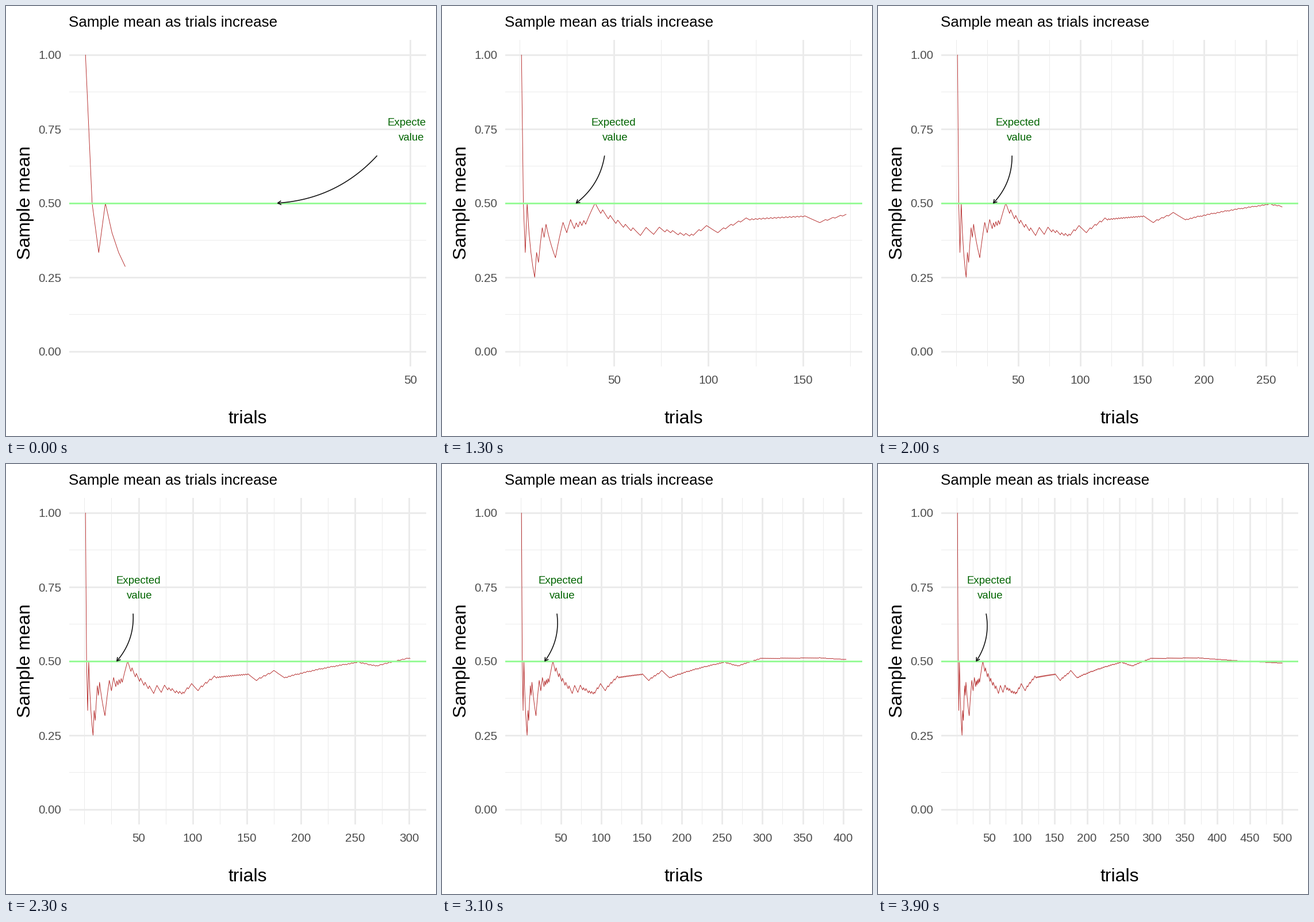
Write a matplotlib script that moves like this. It is 748x748 px and loops after 5000 ms.

```python
import matplotlib.pyplot as plt
import numpy as np
from matplotlib.animation import FuncAnimation
from matplotlib.patches import Rectangle

SIZE = 748
DPI = 100
PX = 72 / DPI

LEFT, RIGHT, TOP, BOTTOM = 110, 731.5, 58.5, 626.5
MID_X = (LEFT + RIGHT) / 2
PAD = (RIGHT - LEFT) * 0.05 / 1.1
TRIALS = 500
REVEAL_FRAMES = 40
FRAMES = 50

plt.rcParams["font.family"] = "Liberation Sans"


def coin_means():
    """Running mean of tosses whose head count passes a few key points."""
    keys = np.array([
        (1, 1), (4, 2), (9, 3), (12, 5), (14, 6), (19, 6), (23, 10), (25, 10),
        (27, 12), (34, 15), (40, 20), (44, 21), (60, 25), (64, 25), (67, 28),
        (71, 28), (74, 31), (91, 36), (99, 42), (104, 42), (120, 54),
        (151, 69), (158, 69), (175, 82), (184, 82), (253, 126), (270, 131),
        (298, 152), (371, 190), (TRIALS, 247),
    ])
    heads = np.floor(np.interp(trial, *keys.T) + 1e-9)
    return heads / trial


trial = np.arange(1, TRIALS + 1)
mean = coin_means()

fig = plt.figure(figsize=(SIZE / DPI, SIZE / DPI), dpi=DPI, facecolor="white")
ax = fig.add_axes([0, 0, 1, 1])
ax.set(xlim=(0, SIZE), ylim=(SIZE, 0))
ax.axis("off")
panel = Rectangle((LEFT, TOP), RIGHT - LEFT, BOTTOM - TOP,
                  transform=ax.transData)


def y_pos(value):
    return 600.8 - 516 * value


def line(x, y, color, width, zorder, smooth=True):
    artist, = ax.plot(x, y, color=color, lw=width * PX, zorder=zorder,
                      antialiased=smooth, solid_capstyle="butt")
    artist.set_clip_path(panel)


def label(x, y, text, size, color="black", **kwargs):
    kwargs = {"ha": "center", "va": "baseline", **kwargs}
    return ax.text(x, y, text, fontsize=size * PX, color=color, zorder=6,
                   **kwargs)


def grid_line(x, y, major):
    line(x, y, "#EBEBEB", 3 if major else 1, int(major), smooth=False)


def draw_titles():
    label(LEFT - 0.5, 36, "Sample mean as trials increase", 26, ha="left")
    label(MID_X, 726, "trials", 32)
    label(42, 342, "Sample mean", 32, rotation=90, rotation_mode="anchor")


def draw_grid(x_pos, low, high):
    for i in range(9):
        y = y_pos(i / 8)
        major = i % 2 == 0
        grid_line([LEFT, RIGHT], [y, y], major)
        if major:
            label(96.5, y + 7.7, f"{i / 8:.2f}", 20.8, "#4D4D4D", ha="right")

    majors = [b for b in range(50, TRIALS + 1, 50) if b <= high]
    minors = [b for b in range(0, TRIALS + 50, 25)
              if low <= b <= high and b not in majors]
    if len(majors) < 2:
        minors = []
    for b in majors + minors:
        grid_line([x_pos(b)] * 2, [TOP, BOTTOM], b in majors)
    for b in majors:
        label(x_pos(b), 657, str(b), 20.8, "#4D4D4D")


def draw_arrow(start, end):
    start, end = np.array(start), np.array(end)
    chord = end - start
    normal = np.array([chord[1], -chord[0]])
    t = np.linspace(0, 1, 30)[:, None]
    curve = start + t * chord + 0.4 * t * (1 - t) * normal
    line(*curve.T, "#111111", 1.6, 4)

    dx, dy = curve[-3] - curve[-1]
    angles = np.arctan2(dy, dx) + np.radians([30, 0, -30])
    reach = np.array([7, 0, 7])
    line(end[0] + reach * np.cos(angles), end[1] + reach * np.sin(angles),
         "#111111", 1.6, 4)


def draw(frame):
    for artist in list(ax.lines) + list(ax.texts):
        artist.remove()

    step = (TRIALS - 1) / (REVEAL_FRAMES - 1)
    shown = min(TRIALS, int(1 + step * (min(frame, REVEAL_FRAMES - 1) + 0.5)))
    last = max(50, shown)
    margin = 0.05 * (last - 1)

    def x_pos(value):
        return LEFT + PAD + (value - 1) / (last - 1) * (RIGHT - LEFT - 2 * PAD)

    draw_titles()
    draw_grid(x_pos, 1 - margin, last + margin)
    line(x_pos(trial[:shown]), y_pos(mean[:shown]), "#B22222", 0.9, 2)
    line([LEFT, RIGHT], [y_pos(0.5)] * 2, "#98FB98", 3, 3, smooth=False)
    draw_arrow((x_pos(45), y_pos(0.66)), (x_pos(30), y_pos(0.5)))
    for text, dx, y in (("Expected", -0.5, 208), ("value", 2, 233.5)):
        note = label(x_pos(50) + dx, y, text, 18.7, "#006400", clip_on=True)
        note.set_clip_path(panel)
    return []


animation = FuncAnimation(fig, draw, frames=FRAMES, interval=100,
                          init_func=lambda: draw(0), repeat=True,
                          repeat_delay=0, blit=False)
plt.show()
```
